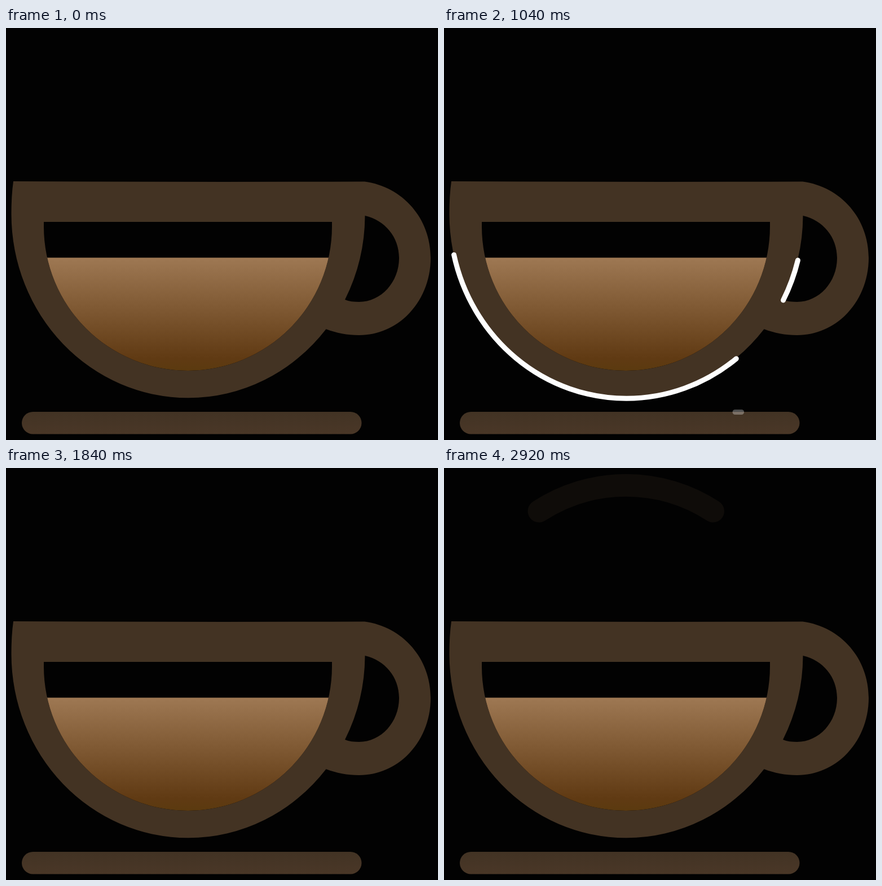
Write an HTML page that moves like this. It is 766x731 px and loops after 4000 ms.

```html
<!DOCTYPE html>
<html lang="en">
<head>
<meta charset="utf-8">
<title>Coffee cup</title>
<style>
  html, body { margin: 0; width: 100%; height: 100%; overflow: hidden; background: #020202; }
  svg { display: block; width: 100%; height: 100%; }
  .steam path { fill: none; stroke: #473726; stroke-linecap: round; opacity: 0; }
  .shine path { fill: none; stroke: #fefefe; stroke-width: 9; stroke-linecap: round; visibility: hidden; }
</style>
</head>
<body>
<svg viewBox="0 0 766 731">
  <defs>
    <linearGradient id="coffee" gradientUnits="userSpaceOnUse" x1="0" y1="408" x2="0" y2="608">
      <stop offset="0" stop-color="#9e7853"/>
      <stop offset=".89" stop-color="#603a13"/>
      <stop offset="1" stop-color="#5b3a0f"/>
    </linearGradient>
    <linearGradient id="plate" x1="0" y1="0" x2="0" y2="1">
      <stop offset="0" stop-color="#423324"/>
      <stop offset="1" stop-color="#4a3727"/>
    </linearGradient>
    <clipPath id="bowl"><path d="M67 344V352A255.5 256 0 0 0 578 352V344Z"/></clipPath>
  </defs>
  <g class="steam">
    <path d="M240.5 214.5A155 155 0 0 1 405 214.5" stroke-width="32"/>
    <path d="M204.5 145.5A219 219 0 0 1 441 145.5" stroke-width="36"/>
    <path d="M168.5 76.5A283 283 0 0 1 477 76.5" stroke-width="40"/>
  </g>
  <path id="cup" fill="#433323" fill-rule="evenodd"/>
  <rect x="60" y="407.5" width="530" height="210" fill="url(#coffee)" clip-path="url(#bowl)"/>
  <rect x="28" y="681" width="602.5" height="39.5" rx="19.75" fill="url(#plate)"/>
  <g class="shine">
    <path id="saucer" d="M611 681.5A19.5 19.5 0 0 1 611 720.5H47.5A19.5 19.5 0 0 1 47.5 681.5H611"/>
    <g transform="translate(.5 1)">
      <path id="outer" d="M636 272.5Q322 273.5 13 272C10.5 290 9.5 310 9.5 330A313.5 326.3 0 0 0 323 656.3A313.5 326.3 0 0 0 567.5 534.2C586 541 605 545 626 545C697 545 753 484 753 408C753 338 704 282 636 272.5"/>
      <path id="inner" d="M601 482A313.5 326 0 0 0 636.5 333C672 341 697 371 697 408C697 451 665 486 626 486C617 486 608 485 601 482"/>
    </g>
  </g>
</svg>
<script>
const LOOP = 4000, TICK = 40, LAST = 2920;
const $ = id => document.getElementById(id);
const clamp = v => Math.max(0, Math.min(1, v));
const ramp = (t, start, span) => clamp((t - start) / span);

$('cup').setAttribute('d',
  $('outer').getAttribute('d') + 'Z' + $('inner').getAttribute('d') + 'Z' +
  'M67 344V352A255.5 256 0 0 0 578 352V344Z');

// Cubic-bezier easing, solved for x by bisection.
function bezier(x1, y1, x2, y2) {
  const at = (p, a, b) => 3 * a * p * (1 - p) ** 2 + 3 * b * p * p * (1 - p) + p ** 3;
  return x => {
    let lo = 0, hi = 1;
    for (let i = 0; i < 24; i++) {
      const mid = (lo + hi) / 2;
      if (at(mid, x1, x2) < x) lo = mid; else hi = mid;
    }
    return at((lo + hi) / 2, y1, y2);
  };
}
const ease = bezier(0.25, 0.1, 0.25, 1);
const glide = bezier(0.35, 0, 0.41, 1);
const move = (easing, start, span) => t => easing(ramp(t, start, span));

// A line of light: its head runs along the path and its tail catches up.
function shine(id, head, tail, alpha = () => 1) {
  const path = $(id), length = path.getTotalLength();
  return t => {
    const from = tail(t) * length, size = head(t) * length - from;
    path.style.visibility = size > 0.1 ? 'visible' : 'hidden';
    path.style.strokeDasharray = `${Math.max(size, 0.1)} 9999`;
    path.style.strokeDashoffset = -from;
    path.style.opacity = alpha(t);
  };
}
const shines = [
  shine('saucer', move(ease, 239, 1174), move(glide, 438, 812), t => 1 - ramp(t, 704, 480)),
  shine('outer', move(ease, 619, 980), move(glide, 735, 864)),
  shine('inner', move(glide, 775, 1095), move(glide, 1131, 700))
];

// Each arc of steam lights up and fades a little after the one below it.
const arcs = document.querySelectorAll('.steam path');
const puff = (t, i) => ramp(t, 60 + 150 * i, 200) - ramp(t, 480 + 122 * i, 240);

function draw(time) {
  const t = Math.min(Math.floor(time % LOOP / TICK) * TICK, LAST);
  arcs.forEach((arc, i) => { arc.style.opacity = puff(t % 2000, i); });
  shines.forEach(update => update(t));
}

const start = performance.now();
function tick() {
  draw(performance.now() - start);
  requestAnimationFrame(tick);
}
tick();
</script>
</body>
</html>
```
